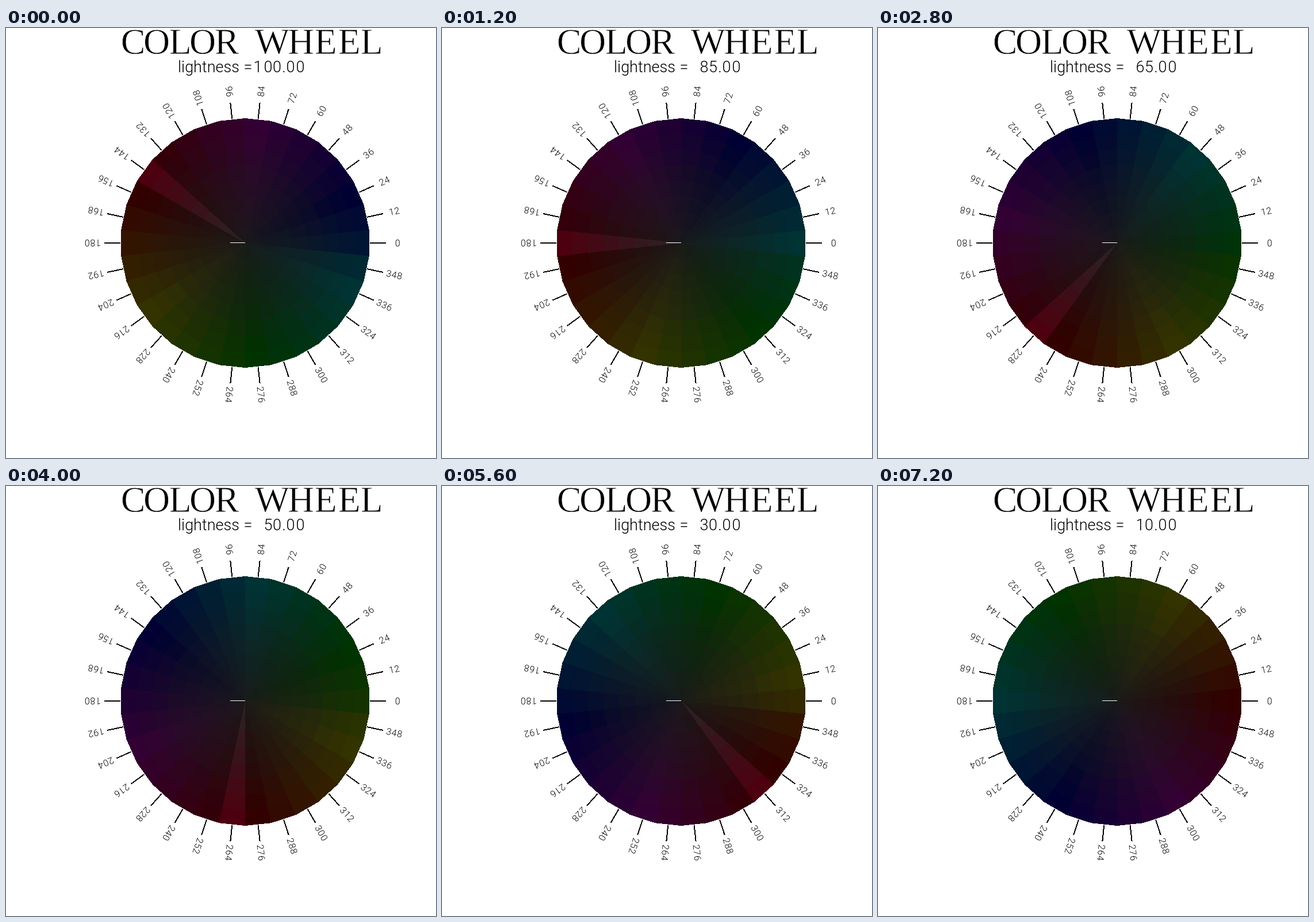
Recreate the animation shown at these times as an HTML page. Size 748 by 748 pixels, loop 7.6 s.

```html
<!DOCTYPE html>
<html lang="en">
<head>
<meta charset="utf-8">
<title>Color wheel</title>
<style>
  html, body { margin: 0; width: 100%; height: 100%; overflow: hidden; background: #fff; }
  svg { display: block; width: 100%; height: 100%; }
  text { fill: #000; font-family: Roboto, "Open Sans", sans-serif; font-weight: 300; white-space: pre; }
  .title { font: 64px "Liberation Serif", "Times New Roman", serif; stroke: #fff; stroke-width: .8; }
  .mid { text-anchor: middle; }
  .sub { font-size: 27px; }
  .label { font-size: 16px; letter-spacing: .7px; text-anchor: middle; }
  #wheel, #ticks { shape-rendering: crispEdges; }
  #ticks { stroke: #000; stroke-width: 2; }
</style>
</head>
<body>
<svg viewBox="0 0 748 748">
  <text class="title mid" y="45" x="221 262 303 342 384 420 463 513 556 597 636">COLOR WHEEL</text>
  <text class="sub" x="299" y="77">lightness</text>
  <text class="sub mid" x="421" y="77">=</text>
  <text class="sub mid" id="value" y="77"></text>
  <g id="ticks"></g>
  <g id="labels"></g>
  <g id="wheel"></g>
  <rect x="390" y="373" width="26" height="1" fill="#fff"/>
</svg>
<script>
const CX = 416, CY = 374, RADIUS = 217;
const SLICES = 30, RINGS = 8, STEP = 360 / SLICES;
const SLOTS = SLICES + 1;           // palette holds one slice more than the wheel
const FRAMES = 19, HOLD = 400;
const DIGIT_X = [438, 456, 471.5, 483.5, 495, 512];

const $ = id => document.getElementById(id);

function add(parent, tag, attrs) {
  const node = document.createElementNS("http://www.w3.org/2000/svg", tag);
  for (const name in attrs) node.setAttribute(name, attrs[name]);
  parent.appendChild(node);
  return node;
}

function polar(r, deg) {
  const a = deg * Math.PI / 180;
  return [CX + r * Math.cos(a), CY - r * Math.sin(a)];
}

// Nested triangles, largest first, leave one visible band per ring.
const slices = Array.from({ length: SLICES }, (_, j) => {
  const angle = j * STEP;
  const [x1, y1] = polar(217, angle), [x2, y2] = polar(245, angle);
  add($("ticks"), "line", { x1, y1, x2, y2 });

  const [x, y] = polar(265.5, angle);
  add($("labels"), "text", {
    class: "label", x, y: y + 5.7, transform: `rotate(${-angle} ${x} ${y})`
  }).textContent = angle;

  return Array.from({ length: RINGS }, (_, i) => {
    const r = RADIUS * (RINGS - i) / RINGS;
    const points = [[CX, CY], polar(r, angle - STEP / 2), polar(r, angle + STEP / 2)];
    return add($("wheel"), "polygon", { points: points.join(" ") });
  });
});

function show(frame) {
  slices.forEach((bands, j) => {
    const slot = (j - frame + FRAMES - 1 + SLOTS) % SLOTS;
    const spare = slot === SLICES;  // keeps the previous, lighter color
    const hue = (spare ? SLICES - 1 : slot) * STEP;
    bands.forEach((band, i) => {
      const sat = 100 * (RINGS - i) / RINGS;
      band.setAttribute("fill", `hsl(${hue}, ${sat}%, ${spare ? 15 : 10}%)`);
    });
  });
  const text = (100 - 5 * frame).toFixed(2);
  $("value").setAttribute("x", DIGIT_X.slice(-text.length).join(" "));
  $("value").textContent = text;
}

let current = -1;
const start = performance.now();

function tick() {
  const frame = Math.floor((performance.now() - start) / HOLD) % FRAMES;
  if (frame !== current) show(current = frame);
  requestAnimationFrame(tick);
}
tick();
</script>
</body>
</html>
```
